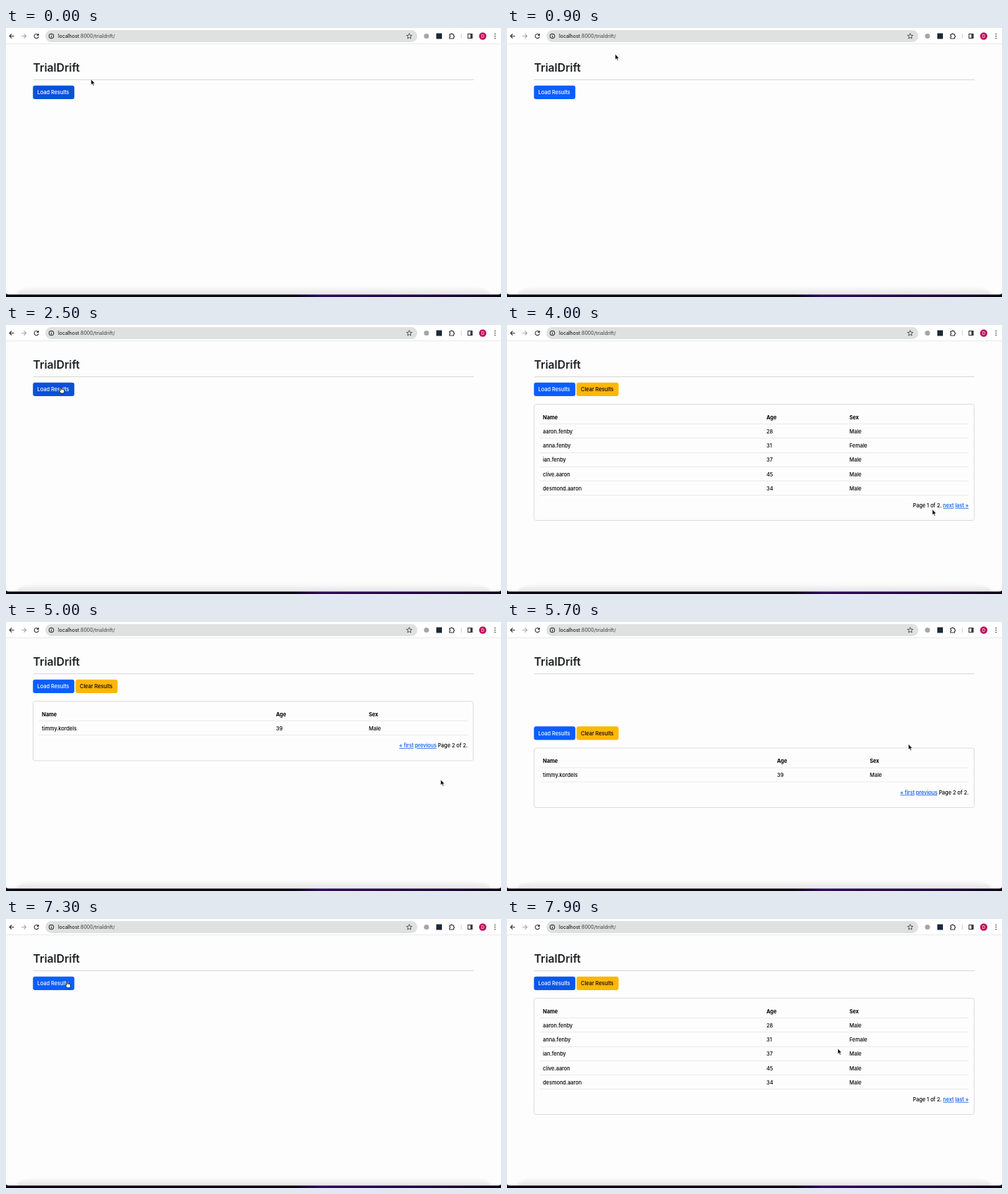
Write an HTML page that moves like this. It is 704 px wide and 382 px high and loops after 8 s.

```html
<!DOCTYPE html>
<html lang="en">
<head>
<meta charset="utf-8">
<title>Paged results</title>
<style>
  html, body { margin: 0; width: 100%; height: 100%; overflow: hidden; background: #fdfdfd; }
  svg { display: block; }
  text { font: 500 7.4px Inter, sans-serif; fill: #000; white-space: pre; }
  .title { font-size: 15.8px; font-weight: 600; fill: #1c1f22; }
  .url { font-size: 6.9px; fill: #505254; }
  .head { font-weight: 700; }
  .link { fill: #0a55e0; text-decoration: underline; }
  .line { fill: none; stroke: #e7e9eb; }
  .card { fill: none; stroke: #d9dbde; }
  .icon { fill: none; stroke: #303234; stroke-width: 1.1; }
</style>
</head>
<body>
<svg width="704" height="382" viewBox="0 0 704 382">
  <defs>
    <linearGradient id="shade" x2="0" y2="1">
      <stop stop-color="#fbfbfb"/><stop offset="1" stop-color="#e4e4e4"/>
    </linearGradient>
    <linearGradient id="desk">
      <stop offset=".58" stop-color="#0a0612"/><stop offset=".64" stop-color="#300a60"/>
      <stop offset=".9" stop-color="#1c0636"/><stop offset="1" stop-color="#0a0612"/>
    </linearGradient>
    <filter id="soft"><feGaussianBlur stdDeviation="1.5"/></filter>
  </defs>

  <rect width="704" height="382" fill="#fdfdfd"/>
  <rect width="704" height="22" fill="#fff"/>
  <path class="line" d="M0 22.5H704"/>
  <rect id="omnibox" x="56" y="3" width="529" height="17" rx="8.5"/>

  <g class="icon">
    <path d="M11.5 11.5H5.2M8 8.5L5 11.5L8 14.5"/>
    <path d="M22 11.5H28.3M25.5 8.5L28.5 11.5L25.5 14.5" stroke="#a6a8aa"/>
    <path id="reload" d="M45.6 9.6A3.1 3.1 0 1 0 46.3 12M46.2 8V10.4H43.8"/>
    <path id="stop" d="M40.8 9L45.8 14M45.8 9L40.8 14"/>
    <circle cx="64.5" cy="11.5" r="3.2"/>
    <path d="M64.5 11V13.4M64.5 9.4V10.3"/>
    <polygon id="star" stroke-width=".8"/>
    <path d="M630.8 9H632.6A1.1 1.1 0 0 1 634.8 9H636.6V10.8A1.1 1.1 0 0 1 636.6 13V15H630.8V13A1.1 1.1 0 0 0 630.8 10.8Z"/>
    <path d="M647.5 8V15" stroke="#d0d4d8"/>
    <rect x="657" y="8.5" width="6" height="6"/>
    <path d="M661.8 8.5V14.5" stroke-width="2.6"/>
    <path d="M695.5 8.5V15" stroke-width="1.7" stroke-linecap="round" stroke-dasharray="0 3"/>
  </g>
  <circle cx="598" cy="11.5" r="3.6" fill="#a3a5a7"/>
  <rect x="612" y="7.5" width="8" height="8" fill="#1d2a38"/>
  <circle cx="678" cy="11.5" r="5.2" fill="#c2135c"/>
  <text x="678" y="13.5" text-anchor="middle" style="font-size:5.5px;fill:#fff">D</text>
  <text class="url" x="74" y="13.9"><tspan fill="#202224">localhost</tspan>:8000/trialdrift/</text>

  <text class="title" x="38.5" y="62.2">TrialDrift</text>
  <path d="M38.5 73.5H665" stroke="#d6d7d8"/>

  <g id="content">
    <rect id="load" x="38.3" y="81.7" width="58.9" height="19.2" rx="3"/>
    <text x="44.5" y="94.2" style="fill:#fff">Load Results</text>
    <g id="clear">
      <rect id="clearFace" x="98.9" y="81.7" width="59.8" height="19.2" rx="3"/>
      <text x="105" y="94.2">Clear Results</text>
    </g>
    <rect id="card" class="card" x="38.5" y="112.5" width="626" rx="3"/>
    <g id="page1"></g>
    <g id="page2"></g>
  </g>

  <path d="M14 379Q18 368 48 367.5H656Q686 368 690 379Z" fill="url(#shade)" filter="url(#soft)"/>
  <path d="M0 376Q0 378.5 4 378.5H700Q704 378.5 704 376V382H0Z" fill="url(#desk)"/>

  <g id="pointer">
    <path id="arrow" d="M0 0V7.6L1.7 6.1L3 9L4.2 8.4L3 5.7H5.4Z" stroke="#fff" stroke-width=".5"/>
    <path id="hand" d="M-.8 .8Q0 -.4 .8 .8V3.4Q4.9 3 4.9 5V6.6Q4.7 8 4 9H-.2Q-1 7.4 -2.5 5.4Q-2.3 4.2 -.8 5.4Z" fill="#fff" stroke="#000" stroke-width=".8"/>
    <path id="beam" d="M-2 -3.5H2M0 -3.5V4M-2 4H2M-1 .8H1" stroke="#222" stroke-width=".9"/>
  </g>
</svg>
<script>
const LOOP = 8000, STEP = 100, ROW = 20.2, SHIFT = 66.5;
const $ = id => document.getElementById(id);
const show = (id, on) => $(id).style.display = on ? '' : 'none';
const link = label => `<tspan class="link">${label}</tspan>`;

function buildTable(id, columns, rows, pager) {
  const lines = [['Name', 'Age', 'Sex'], ...rows].map((row, r) => {
    const y = 133.7 + r * ROW;
    const cells = row.map((cell, c) =>
      `<text class="${r ? '' : 'head'}" x="${columns[c]}" y="${y}">${cell}</text>`);
    return cells.join('') + `<path class="line" d="M47 ${Math.floor(y + 7) + .5}H656.5"/>`;
  });
  const pagerY = 157.9 + rows.length * ROW;
  $(id).innerHTML = lines.join('') + `<text x="656.5" y="${pagerY}" text-anchor="end">${pager}</text>`;
}

buildTable('page1', [51, 369, 487], [
  ['aaron.fenby', 28, 'Male'],
  ['anna.fenby', 31, 'Female'],
  ['ian.fenby', 37, 'Male'],
  ['clive.aaron', 45, 'Male'],
  ['desmond.aaron', 34, 'Male'],
], `Page 1 of 2. ${link('next')} ${link('last »')}`);
buildTable('page2', [51, 384, 516], [
  ['timmy.kordels', 39, 'Male'],
], `${link('« first')} ${link('previous')} Page 2 of 2.`);

$('star').setAttribute('points', Array.from({ length: 10 }, (_, i) => {
  const angle = i * Math.PI / 5, radius = i % 2 ? 1.8 : 4.1;
  return [573.5 + radius * Math.sin(angle), 11.7 - radius * Math.cos(angle)];
}).join(' '));

// When each view begins
const views = [
  ['none', -Infinity], ['empty', 1500], ['none', 1600], ['page1', 2600], ['page2', 4600],
  ['waiting', 5700], ['page1', 5800], ['none', 6900], ['page1', 7500],
];
const viewAt = t => views.findLast(([, from]) => t >= from)[0];

// Pointer moves: start, end, destination
const home = [78, 88];
const moves = [
  [-100, 0, 121, 73], [0, 300, 128, 83],
  [400, 1200, 166, 16],
  [1700, 2400, ...home],
  [3000, 3500, 354, 201], [3600, 3800, 568, 262], [3900, 4000, 605, 262], [4000, 4400, 630.5, 254],
  [4900, 5100, 606, 194], [5200, 5600, 571, 173.5],
  [5700, 6100, 150, 65], [6300, 6500, 134.5, 93],
  [7000, 7400, ...home],
  [7700, 7900, 470.5, 184],
];
const smooth = k => k * k * (3 - 2 * k);

function pointerAt(t) {
  let [x, y] = home;
  for (const [from, to, toX, toY] of moves) {
    if (t <= from) break;
    const k = smooth(Math.min(1, (t - from) / (to - from)));
    x += (toX - x) * k;
    y += (toY - y) * k;
  }
  return [x, y];
}

// What lies under the pointer
function targetAt(t) {
  const [x, y] = pointerAt(t), view = viewAt(t);
  const inside = (left, top, right, bottom) => x >= left && x <= right && y >= top && y <= bottom;
  if (inside(56, 3, 585, 20)) return 'omnibox';
  if (view === 'waiting') return '';
  if (inside(38, 82, 97, 101)) return 'load';
  if (view === 'page1' && inside(99, 82, 158, 101)) return 'clear';
  if (view === 'page1' && inside(619, 251, 657, 261)) return 'link';
  if (view === 'page2' && inside(559, 170, 612, 180)) return 'link';
  return '';
}

// Button colours trail the pointer by a short fade
const hover = (name, t) =>
  [1, 2].filter(n => targetAt(t - n * STEP) === name).length / 2;
const mix = (a, b, k) => `rgb(${a.map((v, i) => Math.round(v + (b[i] - v) * k))})`;

function draw(now) {
  const t = Math.floor(now % LOOP / STEP) * STEP;
  const view = viewAt(t), target = targetAt(t);
  const second = view === 'page2' || view === 'waiting';
  const kind = target === 'omnibox' ? 'beam' : target ? 'hand' : 'arrow';

  show('clear', view !== 'none');
  show('card', view !== 'none');
  show('page1', view === 'page1');
  show('page2', second);
  show('stop', view === 'empty');
  show('reload', view !== 'empty');
  $('card').setAttribute('height', view === 'empty' ? 16.5 : second ? 84.5 : 165);
  $('content').setAttribute('transform', `translate(0 ${view === 'waiting' ? SHIFT : 0})`);

  $('omnibox').style.fill = target === 'omnibox' ? '#d7d8d8' : '#dfe0e0';
  $('load').style.fill = mix([11, 94, 255], [9, 82, 215], hover('load', t));
  $('clearFace').style.fill = mix([255, 183, 5], [255, 189, 38], hover('clear', t));

  for (const name of ['arrow', 'hand', 'beam']) show(name, name === kind);
  $('pointer').setAttribute('transform', `translate(${pointerAt(t)})`);
}

const start = performance.now();
function tick() {
  draw(performance.now() - start);
  requestAnimationFrame(tick);
}
tick();
</script>
</body>
</html>
```
